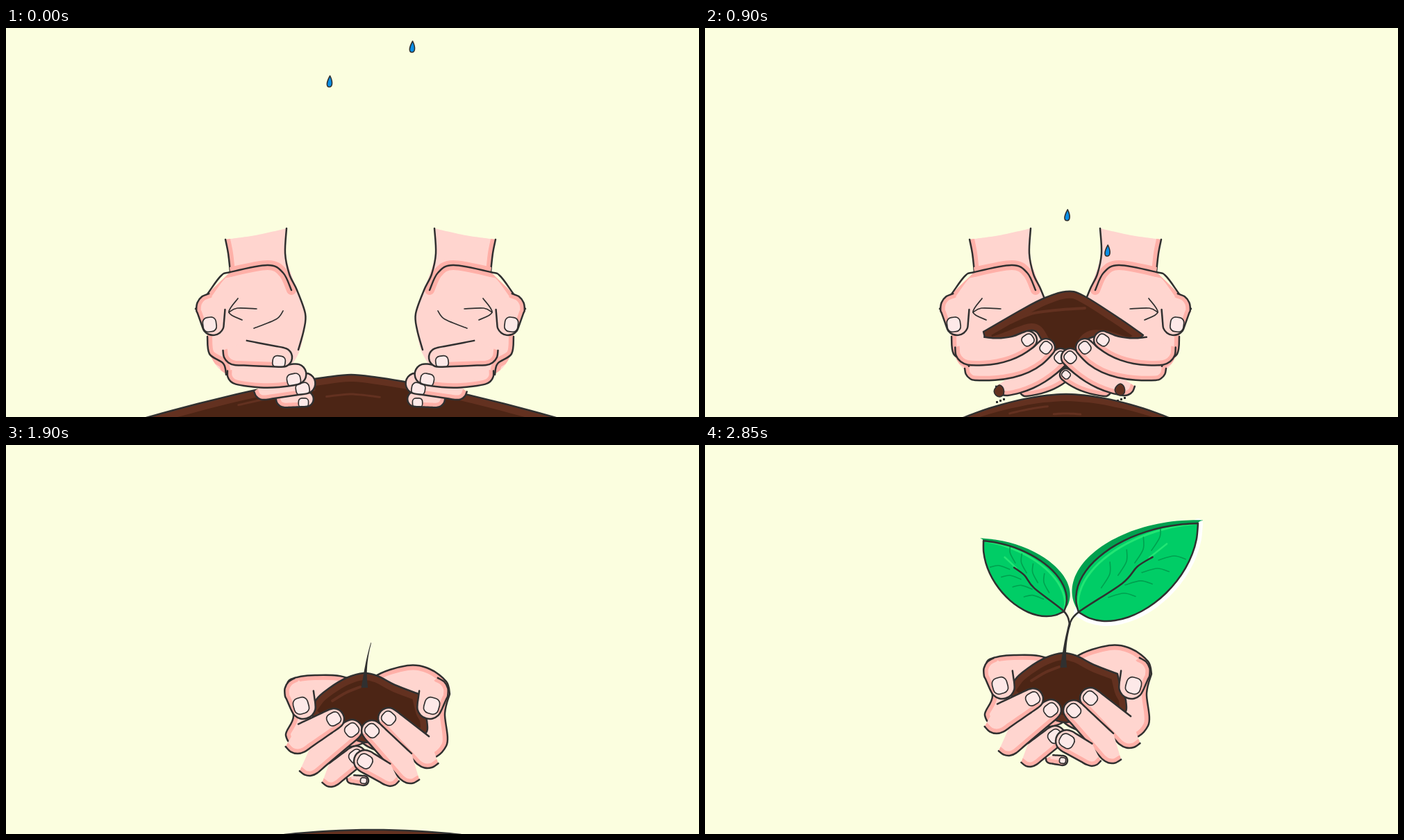
These frames come from a looping animation (998x561 px, 3 s). An HTML page with a canvas:

```html
<!DOCTYPE html>
<html lang="en">
<head>
<meta charset="utf-8">
<title>Growing hands</title>
<style>
html, body { margin: 0; overflow: hidden; background: #fbfedf; }
canvas { display: block; }
</style>
</head>
<body>
<canvas id="stage" width="998" height="561"></canvas>
<script>
const ctx = document.getElementById('stage').getContext('2d');
const INK = '#303030', SKIN = '#ffd5cf', SHADE = '#ffb0a8', NAIL = '#fde9e8';
const SOIL = '#4c2515', CLAY = '#633120';
const LEAF = '#00cd66', DEEP = '#00a04f', BRIGHT = '#22e574';
const { PI } = Math;

const clamp = (v, lo = 0, hi = 1) => Math.max(lo, Math.min(hi, v));
const lerp = (a, b, k) => a + (b - a) * k;
const steps = (n, f) => Array.from({ length: n + 1 }, (_, i) => f(i / n));
const points = s => s.split(' ').map(p => p.split(',').map(Number));

// Smooth curve through points; a repeated point makes a corner.
function curve(pts, closed = false) {
  const n = pts.length, path = new Path2D();
  const at = i => pts[closed ? (i + n) % n : clamp(i, 0, n - 1)];
  path.moveTo(...pts[0]);
  for (let i = 0; i < n - !closed; i++) {
    const [a, b, c, d] = [at(i - 1), at(i), at(i + 1), at(i + 2)];
    if (b[0] === c[0] && b[1] === c[1]) continue;
    path.bezierCurveTo(b[0] + (c[0] - a[0]) / 6, b[1] + (c[1] - a[1]) / 6,
      c[0] - (d[0] - b[0]) / 6, c[1] - (d[1] - b[1]) / 6, c[0], c[1]);
  }
  return path;
}

function fill(path, color) {
  ctx.fillStyle = color;
  ctx.fill(path);
}

function stroke(path, color = INK, width = 2.5) {
  ctx.strokeStyle = color;
  ctx.lineWidth = width;
  ctx.stroke(path);
}

function inside(body, paint) {
  ctx.save();
  ctx.clip(body);
  paint();
  ctx.restore();
}

function contour(body, pts) {
  inside(body, () => stroke(curve(pts), SHADE, 14));
  stroke(curve(pts));
}

// Tapered tube from base to tip with shade on its outer side and a nail.
function finger([tx, ty, tr, bx, by, br, cx = (tx + bx) / 2, cy = (ty + by) / 2], [along, across]) {
  const skin = (s, turn) => {
    const q = 1 - s, r = lerp(br, tr, s);
    const x = q * q * bx + 2 * q * s * cx + s * s * tx;
    const y = q * q * by + 2 * q * s * cy + s * s * ty;
    const dir = Math.atan2(q * (cy - by) + s * (ty - cy), q * (cx - bx) + s * (tx - cx));
    return [x + r * Math.cos(dir + PI / 2 - turn), y + r * Math.sin(dir + PI / 2 - turn)];
  };
  const outer = [...steps(3, s => skin(0, (s - 1) * PI / 2)), ...steps(5, s => skin(s, 0)).slice(1)];
  const rest = [...steps(6, s => skin(1, s * PI)).slice(1), ...steps(5, s => skin(1 - s * .8, PI)).slice(1)];
  const edge = curve([...outer, ...rest]);
  fill(edge, SKIN);
  inside(edge, () => {
    stroke(curve(outer), SHADE, 13);
    ctx.translate(tx, ty);
    ctx.rotate(Math.atan2(ty - cy, tx - cx));
    const plate = new Path2D();
    plate.roundRect(tr * (along - .65), tr * (across - .6), tr * 1.3, tr * 1.2, tr * .45);
    fill(plate, NAIL);
    stroke(plate, INK, 1.7);
  });
  stroke(edge);
}

// Every hand is described as a left one; the right is its mirror image.
function hand(right, shift, paint) {
  ctx.save();
  if (right) {
    ctx.translate(1038, 0);
    ctx.scale(-1, 1);
  }
  ctx.translate(shift, 0);
  paint();
  ctx.restore();
}

const palmShape = points('357,305 357,305 400,299 445,289 445,289 443,325 460,378 472,412 462,470 430,500 362,500 334,470 330,440 314,405 330,385 364,352 364,352 360,325');
const palmEdges = [
  '357,305 361,325 364,352',
  '314,405 330,385 350,358 364,352 418,342 440,353 452,378',
  '331,445 334,470 354,484 358,500'
].map(points);
const palmInner = points('445,289 443,325 449,355 460,378 472,412 470,435 462,464');
const creases = ['375,390 362,410 381,421', '362,410 374,404 402,405', '398,433 430,420 440,408'].map(points);

function palm() {
  const body = curve(palmShape, true);
  fill(body, SKIN);
  palmEdges.forEach(e => contour(body, e));
  stroke(curve(palmInner));
  creases.forEach(c => stroke(curve(c), INK, 1.7));
  finger([339, 427, 16, 336, 404, 21], [0, .3]);
}

// Each finger: tip x, y, radius, base x, y, radius, optional bend point.
const curled = [
  [480, 514, 11, 450, 518, 13],
  [475, 492, 15, 418, 511, 14],
  [460, 481, 15, 378, 493, 16, 420, 496],
  [437, 460, 14, 370, 463, 19]
];
const scooping = [
  [494, 500, 9, 438, 522, 9, 473, 518],
  [488, 475, 13, 410, 515, 15, 453, 510],
  [467, 461, 13, 366, 492, 16, 438, 497],
  [441, 450, 13, 358, 464, 22, 408, 472]
];
const cuppedLeft = [
  [515, 455, 7, 497, 453, 6],
  [504, 420, 15, 468, 448, 16],
  [498, 382, 15, 437, 430, 18],
  [472, 366, 15, 420, 396, 20]
];
const cuppedRight = [
  [487, 365, 15, 431, 416, 21],
  [511, 383, 15, 456, 440, 19],
  [521, 427, 16, 485, 448, 15]
];

// Soil curve between u = from and u = to, where |u| = 1 is the foot.
const slope = ([cx, half, top, power], from = -1, to = 1, drop = 0) => steps(16, s => {
  const u = lerp(from, to, s);
  return [cx + half * u, top + drop + (562 - top) * Math.abs(u) ** power];
});

function mound(shape) {
  const [cx, half, top, power] = shape;
  const outline = curve(slope(shape));
  fill(outline, CLAY);
  fill(curve(slope([cx, half * .86, top + 10, power])), SOIL);
  stroke(curve(slope(shape, -.55, -.18, 16)), CLAY, 3);
  stroke(curve(slope(shape, -.12, .14, 28)), CLAY, 3);
  stroke(outline);
}

const heap = points('401,438 401,438 460,404 490,389 520,380 545,386 600,421 631,443 631,443 612,456 575,446 550,450 530,485 500,485 485,450 470,436 430,450 408,455');
const handful = points('440,360 447,338 465,322 490,307 515,300 535,304 560,317 594,330 594,330 600,355 606,368 602,388 560,385 520,400 480,385');

function lump(shape, streak) {
  const body = curve(shape, true);
  fill(body, SOIL);
  inside(body, () => stroke(body, CLAY, 20));
  stroke(curve(points(streak)), CLAY, 4);
  stroke(body);
}

function clods() {
  for (const [x, y] of [[424, 524], [598, 522]]) {
    const blob = curve(steps(7, s => [x + (6 + s * 2) * Math.sin(s * 5.5), y - (9 - s * 2) * Math.cos(s * 5.5)]), true);
    fill(blob, CLAY);
    stroke(blob, INK, 1.7);
    ctx.fillStyle = INK;
    for (let i = -1; i < 2; i++) ctx.fillRect(x + i * 5, y + 12 - i * 2, 3, 3);
  }
}

function fists(t) {
  const k = clamp(t / 600), push = Math.max(0, t - 600) * .08;
  mound([lerp(497, 510, k), lerp(295, 163, k), lerp(500, 458, k), 1.35]);
  for (const right of [0, 1]) {
    hand(right, push - (right ? 24 : 41) * (1 - k), () => {
      palm();
      ctx.translate(345, 480);
      ctx.rotate(.16 * (1 - k));
      ctx.translate(-345, -480);
      curled.forEach(f => finger(f, [-.3, .5]));
    });
  }
}

function scoop(t) {
  const push = Math.min(40, (t - 600) * .08);
  mound([520, 148, 528, 1.75]);
  for (const right of [0, 1]) hand(right, push, palm);
  lump(heap, '440,425 470,412 505,407 547,404');
  for (const right of [0, 1]) hand(right, push, () => scooping.forEach(f => finger(f, [0, 0])));
  clods();
}

const cupPalms = [
  '404,322 410,309 445,303 491,307 515,335 515,400 425,405 403,390 414,362',
  '399,330 404,312 428,294 460,289 508,306 525,340 525,400 440,425 404,405 406,358'
].map(points);

function cup(t) {
  if (t < 2000) mound([528, 127, 532, 2].map((v, i) => i === 2 ? v + Math.max(-3, (t - 1500) * .0575) : v));
  const open = clamp((t - 2500) / 200);
  ctx.save();
  ctx.translate(0, clamp((2300 - t) * .0725, 0, 61.6));
  cupPalms.forEach((shape, right) => hand(right, -4 * right * open, () => {
    const body = curve(shape, true);
    fill(body, SKIN);
    contour(body, [...shape, shape[0]]);
  }));
  lump(handful, '470,340 490,328 510,320');
  [cuppedLeft, cuppedRight].forEach((set, right) => hand(right, -4 * right * open, () => {
    finger([428, 348, 18, 422, 327, 21], [-.1, .15]);
    set.forEach(f => finger(f, [0, 0]));
  }));
  if (t >= 1450) sprout(t, open);
  ctx.restore();
}

function sprout(t, open) {
  const height = 64 * (t < 2000 ? Math.min(1.17, .36 + (t - 1500) * .0016) : 1);
  const side = d => s => [516.5 + 9 * s * s + d * (3 * (1 - s) ** 3 + lerp(1.8, t < 2000 ? .4 : 1.5, s)), 321 - height * s];
  fill(curve([...steps(6, side(-1)), ...steps(6, s => side(1)(1 - s))]), INK);
  if (t < 2000) return;
  const grow = clamp((t - 1950) / 500), size = Math.sqrt(grow), droop = .32 * (1 - grow);
  const place = (dir, base0, tip0, base1, tip1) => {
    const c = Math.cos(droop * dir) * size, s = Math.sin(droop * dir) * size;
    const spot = (a, b) => {
      const x = lerp(a[0], b[0], open) - 525, y = lerp(a[1], b[1], open) - 257;
      return [525 + x * c - y * s, 257 + x * s + y * c];
    };
    leaf(spot(base0, base1), spot(tip0, tip1), dir, dir > 0 && t >= 2850);
  };
  place(-1, [511, 239], [406, 170], [517, 240], [401, 138]);
  place(1, [541, 238], [691, 141], [538, 241], [710, 113]);
}

function leaf([bx, by], [tx, ty], dir, halo) {
  const dx = tx - bx, dy = ty - by;
  // a runs from base to tip, p rises from the midrib.
  const at = (a, p) => [bx + a * dx + p * dir * dy, by + a * dy - p * dir * dx];
  const edge = (c1, c2, h, end = 1) => steps(12, s => {
    const q = 1 - s;
    return at(3 * q * q * s * c1 + 3 * q * s * s * c2 + s * s * s * end, 3 * q * s * h);
  });
  const top = edge(.08, .6, .29), low = edge(.1, .75, -.34);
  const body = curve([...low, ...top.slice().reverse()], true);
  if (halo) stroke(curve(low), '#ffffff', 14);
  fill(curve([...edge(.02, .6, .35, 1.035), ...low.slice().reverse()], true), DEEP);
  fill(body, LEAF);
  inside(body, () => stroke(curve(edge(.12, .6, .25)), BRIGHT, 3));
  for (let a = .22; a < .65; a += .14) {
    for (const p of [.04, -.04]) stroke(curve([at(a, p), at(a + .1, p * 2), at(a + .15, p * 3.6)]), DEEP, 1.6);
  }
  stroke(curve([at(.6, .01), at(.75, .015)]), BRIGHT, 2.5);
  stroke(body);
  stroke(curve([at(.62, 0), at(.5, .01), at(.35, -.02), at(0, 0), [525, 258]]));
}

// x, y and late speed of each drop at the moment it starts to slow.
const rain = [[462, 293, .36, 700], [581, 243, .26, 1150], [523, 178, .306, 1200]];

function drops(t) {
  const late = t - 600;
  for (const [x, y, speed, end] of rain) {
    if (t >= end) continue;
    ctx.save();
    ctx.translate(x - late * .006, y + late * (late < 0 ? .36 : speed));
    const drop = new Path2D('M1 -8 C6 2 4 8 0 8 C-5 8 -4 1 1 -8Z');
    fill(drop, '#0a8fe6');
    stroke(drop, INK, 1.6);
    ctx.restore();
  }
}

function frame(now) {
  const t = Math.floor(now % 3000 / 50) * 50;
  ctx.fillStyle = '#fbfedf';
  ctx.fillRect(0, 0, 998, 561);
  ctx.lineCap = ctx.lineJoin = 'round';
  (t < 900 ? fists : t < 1200 ? scoop : cup)(t);
  drops(t);
  requestAnimationFrame(frame);
}
frame(0);
</script>
</body>
</html>
```
